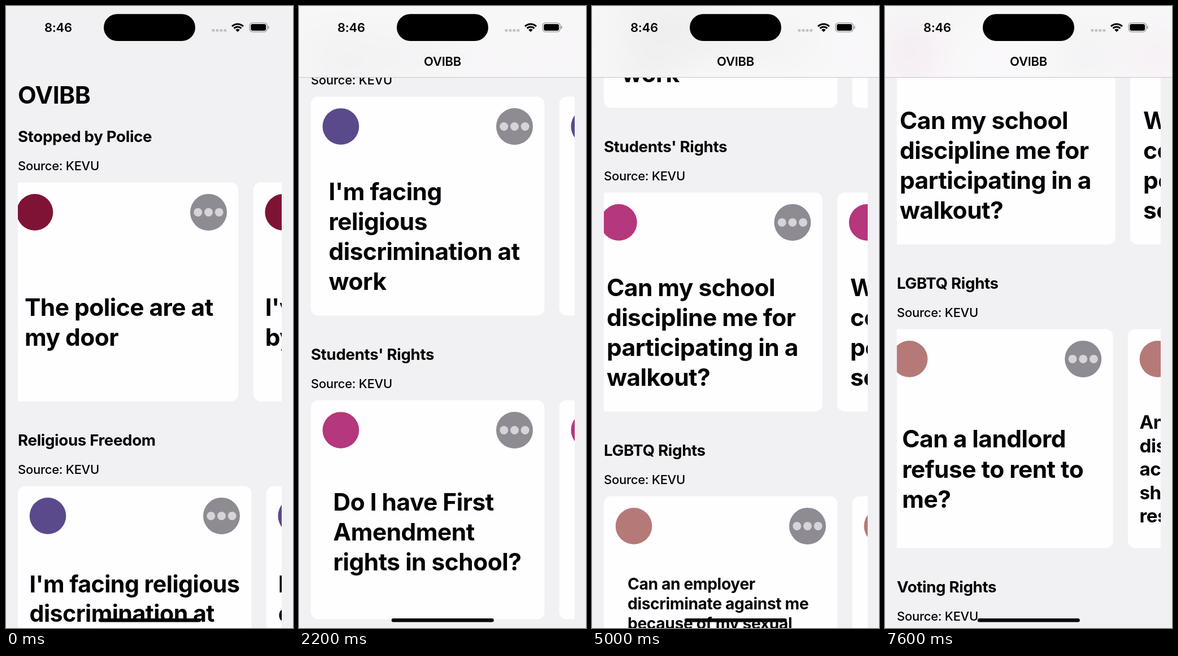
An HTML page with a canvas for the animation above (7.7 s loop, 508 by 1102 pixels).

```html
<!DOCTYPE html>
<html lang="en">
<head>
<meta charset="utf-8">
<title>Know your rights</title>
<style>
  html, body { margin: 0; width: 100%; height: 100%; overflow: hidden; background: #f1f0f3; }
  canvas { display: block; }
</style>
</head>
<body>
<canvas id="stage" width="508" height="1102"></canvas>
<script>
const W = 508, H = 1102, LOOP = 7700, STEP = 100;
const MARGIN = 21, RIGHT = 488, NAV = 126;
const CARD_W = 413.5, CARD_H = 388, CARD_PITCH = 439.7, SECTION_PITCH = 538;
const BG = '#f1f0f3', INK = '#020203';

const screen = document.getElementById('stage').getContext('2d');
const pageCanvas = document.createElement('canvas');
pageCanvas.width = W;
pageCanvas.height = H;
const page = pageCanvas.getContext('2d');

// Lines, left inset and line height of a card's text. Options:
// below / beside: layout while the card is cut off at the bottom / right edge,
// middle: height of the text centre within the card.
const card = (text, inset = 20.5, lineHeight = 53.1, options = {}) =>
  ({ lines: text.split('|'), inset, lineHeight, middle: 247.7, ...options });

const compact = (text, inset, lineHeight) => card(text, inset, lineHeight, { middle: 225.5 });

const sections = [
  { title: 'Stopped by Police', color: '#7e1336', cards: [
    card('The police are at|my door', 35),
    card("I've been stopped|by the police", 21)] },
  { title: 'Religious Freedom', color: '#5a4a8c', cards: [
    card("I'm facing|religious|discrimination at|work", 31.5, 53.1,
      { below: compact("I'm facing religious|discrimination at|work", 20.5, 51.4) }),
    card('I was denied|care at my|local clinic', 40, 53.1,
      { below: compact('I was denied|care at my|local clinic', 21, 51.4) })] },
  { title: "Students' Rights", color: '#b5377c', cards: [
    card('Do I have First|Amendment|rights in school?', 39.5, 53.1, { middle: 233.5 }),
    card('Can my school tell|me what I can and|cannot wear based|on my gender?', 20.5, 51.2,
      { beside: card('Can my school tell|me what I can and|cannot wear based|on my gender?', 40, 46) }),
    card('Can my school|discipline me for|participating in a|walkout?', 31.5),
    card('What can I say|concerning the|police in my|school?', 23)] },
  { title: 'LGBTQ Rights', color: '#b57a78', cards: [
    card('Can an employer|discriminate against|me because of my|sexual orientation or|gender identity?', 29, 44.1,
      { below: compact('Can an employer|discriminate against me|because of my sexual|orientation or gender|identity?', 42, 35.2) }),
    card('Can a landlord|refuse to rent to|me?', 40),
    card('An owner can be|discriminating in|access to homes,|shelters, shops,|restrooms?', 20.5, 41.5)] },
  { title: 'Voting Rights', color: '#5a4a8c', cards: [] }
];

// Swipe: quick pick-up under the finger, then a long glide to rest.
function swipe(t, start, end, distance) {
  const u = Math.min(1, Math.max(0, (t - start) / (end - start)));
  return distance * (1 - Math.pow(1 - Math.pow(u, 1.72), 2.4));
}

const scrollY = t =>
  swipe(t, 800, 1400, 628) + swipe(t, 2100, 2600, 430) + swipe(t, 5400, 5900, 296);

const scrollX = t => [
  23,
  0,
  swipe(t, 3200, 4000, 453) + swipe(t, 4000, 4800, 453),
  swipe(t, 6600, 7600, 470.5),
  0
];

function label(c, text, x, centerY, size, weight, align = 'left') {
  c.font = `${weight} ${size}px Inter, sans-serif`;
  c.letterSpacing = `${-0.0125 * size}px`;
  c.textAlign = align;
  c.fillStyle = INK;
  c.fillText(text, x, centerY + size * 0.363);
}

function disc(c, x, y, r, color) {
  c.fillStyle = color;
  c.beginPath();
  c.arc(x, y, r, 0, Math.PI * 2);
  c.fill();
}

function pill(c, x, y, w, h, r, color) {
  c.fillStyle = color;
  c.beginPath();
  c.roundRect(x, y, w, h, r);
  c.fill();
}

function layoutOf(item, x, y) {
  if (item.below && y + CARD_H > H) return item.below;
  if (item.beside && x + CARD_W > RIGHT) return item.beside;
  return item;
}

function drawCard(c, item, color, x, y) {
  pill(c, x, y, CARD_W, CARD_H, 13, '#fefdff');
  disc(c, x + 53, y + 53, 32.3, color);
  disc(c, x + 360.5, y + 53, 32.5, '#8e8b92');
  for (const dx of [-18.7, 0, 18.7]) disc(c, x + 360.5 + dx, y + 53, 7.5, '#d6d4d8');

  const { lines, inset, lineHeight, middle } = layoutOf(item, x, y);
  const first = y + middle - (lines.length - 1) / 2 * lineHeight;
  lines.forEach((line, i) =>
    label(c, line, x + inset, first + i * lineHeight, lineHeight * 0.8, 700));
}

function drawPage(t, offset) {
  const c = page, shifts = scrollX(t);
  c.fillStyle = BG;
  c.fillRect(0, 0, W, H);

  c.save();
  c.beginPath();
  c.rect(0, NAV, W, H);
  c.clip();
  label(c, 'OVIBB', MARGIN, 158 - offset, 42.5, 700);
  c.restore();

  sections.forEach((section, i) => {
    const y = 231 + i * SECTION_PITCH - offset;
    if (y > H + 40 || y < -520) return;
    label(c, section.title, MARGIN, y, 27.7, 700);
    label(c, 'Source: KEVU', MARGIN, y + 52, 22, 500);
    c.save();
    c.beginPath();
    c.rect(MARGIN, y + 60, RIGHT - MARGIN, 440);
    c.clip();
    section.cards.forEach((item, k) => {
      const x = MARGIN + k * CARD_PITCH - shifts[i];
      if (x < RIGHT && x + CARD_W > MARGIN) drawCard(c, item, section.color, x, y + 81.4);
    });
    c.restore();
  });
}

function drawNavBar(c) {
  c.save();
  c.beginPath();
  c.rect(0, 0, W, NAV);
  c.clip();
  c.fillStyle = BG;
  c.fillRect(0, 0, W, NAV);
  c.filter = 'blur(38px)';
  c.drawImage(pageCanvas, 0, 0);
  c.filter = 'none';
  c.fillStyle = 'rgba(249, 248, 249, 0.84)';
  c.fillRect(0, 0, W, NAV);
  c.restore();
  c.fillStyle = '#c6c5c8';
  c.fillRect(0, NAV, W, 1);
  label(c, 'OVIBB', 254, 98, 22, 600, 'center');
}

function drawWifi(c, x, y) {
  const from = -Math.PI * 0.75, to = -Math.PI * 0.25;
  c.strokeStyle = c.fillStyle = '#000';
  c.lineWidth = 3.2;
  for (const r of [14, 9]) {
    c.beginPath();
    c.arc(x, y, r, from, to);
    c.stroke();
  }
  c.beginPath();
  c.moveTo(x, y);
  c.arc(x, y, 5.4, from, to);
  c.fill();
}

function drawStatusBar(c) {
  label(c, '8:46', 68, 38, 22, 600);
  pill(c, 173, 14.2, 162, 47.8, 23.9, '#000');
  for (let i = 0; i < 4; i++) pill(c, 364.5 + i * 7, 41, 4.8, 4.5, 1.3, '#c1c0c3');
  drawWifi(c, 410, 46);
  c.strokeStyle = '#98979b';
  c.lineWidth = 1.3;
  c.beginPath();
  c.roundRect(431.2, 29.8, 31, 16, 5);
  c.stroke();
  pill(c, 433.3, 31.9, 26.8, 11.8, 3.2, '#000');
  pill(c, 463.6, 35.2, 2, 5.2, 1, '#98979b');
}

function draw(t) {
  const offset = scrollY(t);
  drawPage(t, offset);
  screen.drawImage(pageCanvas, 0, 0);
  if (offset > 80) drawNavBar(screen);
  drawStatusBar(screen);
  pill(screen, 163.8, 1085, 181, 6.6, 3.3, '#050507');
}

let shown = -1;
const origin = performance.now();

function tick() {
  const elapsed = Math.max(0, performance.now() - origin) % LOOP;
  const t = Math.floor(elapsed / STEP) * STEP;
  if (t !== shown) draw(shown = t);
  requestAnimationFrame(tick);
}
tick();
</script>
</body>
</html>
```
